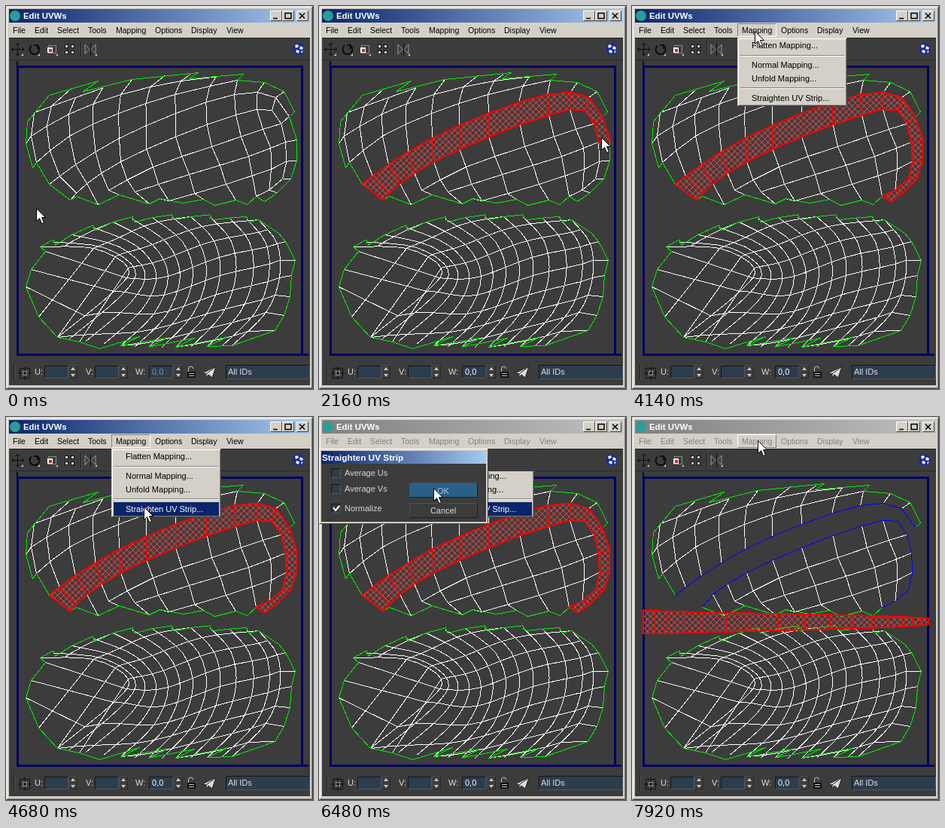
An HTML page for the animation above (8 s loop, 408x508 px).

```html
<!DOCTYPE html>
<html lang="en">
<head>
<meta charset="utf-8">
<title>Edit UVWs</title>
<style>
html, body { margin: 0; width: 100%; height: 100%; overflow: hidden; background: #d4d0c8; }
svg { display: block; width: 408px; height: 508px; font: 11px "Liberation Sans", Arial, sans-serif; cursor: default; }
text { white-space: pre; }
.mesh path { fill: none; stroke-width: 1; }
.white { stroke: #fff; }
.green { stroke: #0e0; }
.blue { stroke: #00f; }
.b { font-weight: bold; }
</style>
</head>
<body>
<svg id="stage" viewBox="0 0 408 508" xmlns="http://www.w3.org/2000/svg"></svg>
<script>
const pts = s => s.split(' ').map(p => p.split(',').map(Number));
const range = (n, f) => Array.from({ length: n }, (_, i) => f(i));
const line = p => 'M' + p.join('L');
const lerp = (a, b, f) => a.map((v, i) => v + (b[i] - v) * f);
const rect = (x, y, w, h, fill, extra = '') =>
  `<rect x="${x}" y="${y}" width="${w}" height="${h}" fill="${fill}" ${extra}/>`;
const text = (x, y, s, fill = '', extra = '') =>
  `<text x="${x}" y="${y}" ${fill && `fill="${fill}"`} ${extra}>${s}</text>`;
const path = (d, stroke, extra = 'fill="none"') => `<path d="${d}" stroke="${stroke}" ${extra}/>`;
// Box edges: light on the top left, dark on the bottom right
const bevel = (x, y, w, h, hi, lo) =>
  path(`M${x + .5} ${y + h - .5}v${1 - h}h${w - 1}`, hi) +
  path(`M${x + .5} ${y + h - .5}h${w - 1}v${1 - h}`, lo);

// Catmull-Rom point at u, with key points at whole numbers
function spline(list, u) {
  const n = list.length - 1, i = Math.min(n - 1, Math.floor(u)), f = u - i;
  const [a, b, c, d] = [i - 1, i, i + 1, i + 2].map(k => list[Math.max(0, Math.min(n, k))]);
  return [0, 1].map(k => +(b[k] + f / 2 * (c[k] - a[k] +
    f * (2 * a[k] - 5 * b[k] + 4 * c[k] - d[k] + f * (3 * (b[k] - c[k]) + d[k] - a[k])))).toFixed(1));
}
// Key points sit on every second grid line
const sample = (keys, n) => range(n, k => spline(pts(keys), k / 2));

// Upper shell: both edges of the strip, then the rows above and below it
const T = sample('57,236 92,210 150,175 225,142 303,117 358,121 386,177 378,229 343,259', 17);
const B = sample('85,257 107,235 152,206 225,173 305,144 353,138 371,180 367,229 332,252', 17);
const up = [
  '40,207 84,172 149,142 224,117 307,98',
  '33,172 83,143 152,117 232,99 316,90',
  '37,141 92,121 167,97 245,90'
].map((keys, i) => sample(keys, 9 - i));
const low = [
  '136,244 195,213 273,186 341,163',
  '171,246 243,223 322,199 371,180',
  '216,258 292,236 352,216'
].map((keys, i) => sample(keys, 7 - i));
const top1 = pts('57,236 40,207 35,214 26,182 28,153 57,118 122,99 102,113 167,97 255,88 243,96 315,90 307,98 343,101 369,113 383,140 377,146');
const hem = pts('93,252 122,263 150,250 190,262 204,255 235,261 262,256 277,264 305,257 320,263 332,252');

function upperMesh() {
  const ends = [hem[2], hem[3], hem[4], hem[6], hem[8], B[16], B[15]];
  const lines = [
    [top1[2], ...up[0]], [top1[3], ...up[1]], up[2].slice(0, 4), [up[2][1], [84, 111]],
    [T[9], top1[13]], [T[10], top1[14]], [B[2], hem[1]],
    ...low.map((r, i) => [...r, B[11 + i]]),
    ...range(9, k => [T[k], ...up.map(r => r[k]).filter(Boolean)]),
    ...range(7, k => [B[k + 3], ...low.map((r, i) => r[k - i]).filter(Boolean), ends[k]])
  ];
  return lines.map(line).join('');
}

// Lower shell: columns j = 0..12 blend four key columns, t = 0..8 runs down each
const keyCols = [
  '45,319 116,321 162,347 143,378 68,439',
  '142,286 194,316 215,358 196,408 152,450',
  '245,279 276,311 284,357 266,408 225,452',
  '335,283 360,315 363,360 345,406 300,450'
].map(pts);
const at = (j, t) => spline(keyCols.map(k => spline(k, t / 2)), j / 4);
const right = pts('371,312 384,337 379,357 377,385 369,410 357,430');
const left = pts('97,445 68,439 43,412 26,372 33,349 52,325');

function lowerMesh() {
  const lines = [
    ...right.map((p, i) => [at(12, i + 2), p]),
    ...range(13, j => range(17, i => at(j, i / 2))),
    // Rows climb a quarter step per column
    ...range(10, i => range(13, j => [j, i + 1 - j / 4])
      .filter(([, t]) => t >= 0 && t <= 8).map(([j, t]) => at(j, t))),
    ...range(3, k => [at(0, 4 - k), left[k]]),
    ...range(3, k => [at(0, 7 - k), left[k + 3]])
  ];
  return lines.map(line).join('');
}

function lowerEdge() {
  const rim = range(13, j => at(j, 0)).flatMap(([x, y], j) => j % 2 ? [[x, y - 3], [x + 3, y + 4]] : [[x, y]]);
  const teeth = [10, 8, 6, 4].flatMap(j => { const [x, y] = at(j, 8); return [[x, y], [x + 25, y - 12]]; });
  return line([...rim, [362, 301], ...right, at(12, 8), ...teeth, [124, 454], ...left]) + 'Z';
}

const strip = (a, b) => ({
  edge: line([...a, ...b.slice().reverse()]) + 'Z',
  bars: a.map((p, i) => line([p, b[i]])).join('')
});
// Straightened strip: wide quads in the middle, narrow ones at the ends
const flatX = i => {
  const u = (i / 16) ** .88;
  return 14 + 379 * (u - .55 * Math.sin(2 * Math.PI * u) / (2 * Math.PI));
};
const flatStrip = strip(
  range(17, i => [flatX(i), 256 + i * .66]),
  range(17, i => [flatX(i), 286 - Math.max(0, i - 3) * .85])
);

const menus = [[9, 'File'], [38, 'Edit'], [68, 'Select'], [109, 'Tools'], [146, 'Mapping'], [198, 'Options'], [246, 'Display'], [293, 'View']];
const grad = (id, a, b) => `<linearGradient id="${id}"><stop stop-color="${a}"/><stop offset="1" stop-color="${b}"/></linearGradient>`;
const button = (x, glyph) => rect(x, 6, 16, 14, '#d4d0c8') + bevel(x, 6, 16, 14, '#fff', '#404040') + path(glyph, '#000', 'fill="none" stroke-width="1.5"');
const field = (x, y, w, h) => rect(x, y, w, h, '#2c3d4e') + bevel(x, y, w, h, '#161616', '#555');
const spinner = x => path(`M${x - 3} 483l3 -4l3 4zM${x - 3} 488l3 4l3 -4z`, 'none', 'fill="#ccc"') + bevel(x - 6, 476, 12, 18, '#484848', '#2a2a2a');
const check = (y, s) => field(16, y - 6, 13, 13) + text(34, y + 4, s, '#d6d6d6');
const push = y => rect(120, y, 91, 20, '#3c3c3c') + bevel(120, y, 91, 20, '#505050', '#1c1c1c');
const groove = (x, y) => rect(x, y, 1, 21, '#1c1c1c') + rect(x + 1, y, 1, 21, '#555');

const frame =
  rect(0, 0, 408, 508, '#d4d0c8') + bevel(1, 1, 406, 506, '#fff', '#808080') + bevel(0, 0, 408, 508, '#d4d0c8', '#404040') +
  rect(4, 4, 400, 18, 'url(#on)', 'id="title"') +
  '<circle cx="12" cy="13" r="7" fill="#2a9d98"/>' + text(23, 17, 'Edit UVWs', '#fff', 'class="b" font-size="11.4"') +
  button(351, 'M355 16.5h6') + button(367, 'M371 9.5h8v7h-8z') + button(386, 'M390 9.5l7 7m0 -7l-7 7') +
  `<g id="menus" font-size="10.5">${menus.map(([x, s]) => text(x, 36, s)).join('')}</g>` +
  `<g id="hover">${bevel(140, 23, 52, 18, '#fff', '#808080')}</g><g id="sunk">${bevel(140, 23, 52, 18, '#808080', '#fff')}</g>` +
  rect(4, 42, 400, 461, '#3c3c3c') + rect(4, 42, 400, 1, '#222') + rect(4, 71, 400, 1, '#2a2a2a');

const tools =
  path('M15.5 50v15M8 57.5h15M13 52l2.5 -3l2.5 3M13 63l2.5 3l2.5 -3M10 55l-3 2.5l3 2.5M21 55l3 2.5l-3 2.5', '#0c0c0c') +
  path('M34 52.5a6.5 6.5 0 1 0 8 0M42 57v-5h-5', '#0c0c0c', 'fill="none" stroke-width="2"') +
  rect(56.5, 52.5, 10, 10, 'none', 'stroke="#ddd" stroke-dasharray="1 1"') + rect(55, 55, 7, 7, '#fff') + rect(57, 57, 4, 4, '#e02020') +
  range(4, i => {
    const x = 78 + i % 2 * 8, y = 51 + (i >> 1) * 8;
    return rect(x, y, 5, 5, '#111') + rect(x + 1, y + 1, 3, 3, '#ddd');
  }).join('') +
  path('M105 51l6 6.5l-6 6zM119 51l-6 6.5l6 6z', '#999') + path('M112.5 49v17', '#111') +
  [23, 45, 69, 121].map(x => path(`M${x} 66h-3l3 -3z`, 'none', 'fill="#ccc"')).join('') +
  groove(99, 47) +
  '<circle cx="389" cy="57" r="7.5" fill="#142a9a"/>' +
  path('M384 52l4 -1l1 3l-4 2zM391 53l4 2l-1 3l-4 -1zM386 58l4 1l-1 4l-4 -2zM392 60l3 -1l-2 4z', 'none', 'fill="#eef"');

const view =
  rect(15.5, 80.5, 378, 382, 'none', 'stroke="#000064" stroke-width="3"') +
  rect(14, 73, 2, 8, '#000064') + rect(394, 461, 8, 3, '#000064');

const bottom =
  rect(4, 465, 400, 38, '#3c3c3c') + groove(10, 475) +
  path('M18.5 480.5h13v13h-13zM25 478v18M16 487h18', '#111') + path('M22.5 484.5h5v5h-5z', '#999') +
  [[38, 51, 89, 'U:'], [106, 118, 156, 'V:'], [172, 190, 229, 'W:']].map(([x, f, sp, s]) =>
    text(x, 489, s, '#ddd') + field(f, 477, 32, 17) + spinner(sp)).join('') +
  text(194, 489, '0,0', '#fff', 'id="w"') +
  path('M242.5 485v-4a3 3 0 0 1 6 0', '#ccc') + rect(241, 485, 11, 8, '#111') + path('M243 487.5h7M243 490.5h7', '#ccc') +
  path('M261 487l18 -9l-5 15l-5 -4l-3 4v-5z', '#222', 'fill="#ddd"') + path('M266 488l12 -9', '#222') +
  field(292, 476, 112, 19) + text(295, 489, 'All IDs', '#ddd');

const items = [[56, 'Flatten Mapping...'], [82, 'Normal Mapping...'], [100, 'Unfold Mapping...'], [126, 'Straighten UV Strip...']];
const sep = y => rect(144, y, 138, 1, '#808080') + rect(144, y + 1, 138, 1, '#fff');
const popup =
  rect(140, 42, 146, 91, '#d4d0c8') + bevel(141, 43, 144, 89, '#fff', '#808080') + bevel(140, 42, 146, 91, '#d4d0c8', '#404040') +
  sep(65) + sep(108) +
  items.map(([y, s]) => `<g class="item">${rect(143, y - 13, 140, 18, 'none')}${text(159, y, s)}</g>`).join('');

const dialog =
  rect(224, 42, 64, 30, '#3c3c3c') +
  rect(0, 42, 225, 100, '#d4d0c8') + bevel(0, 42, 225, 100, '#fff', '#404040') +
  rect(3, 45, 219, 17, 'url(#on)') + text(4, 58, 'Straighten UV Strip', '#fff', 'class="b" font-size="11.8"') +
  rect(3, 62, 219, 77, '#3c3c3c') +
  check(74, 'Average Us') + check(95, 'Average Vs') + check(121, 'Normalize') +
  path('M19 120l3 4l5 -6', '#fff', 'id="tick" fill="none" stroke-width="2"') +
  push(87) + push(114) + rect(121, 88, 89, 18, '#2a6088', 'id="hot"') +
  text(165, 102, 'OK', '#ddd', 'id="ok" text-anchor="middle"') + text(165, 128, 'Cancel', '#ddd', 'text-anchor="middle"');

const mesh = (d, cls) => `<path class="${cls}" d="${d}"/>`;
const stage = document.getElementById('stage');
stage.innerHTML =
  `<defs>${grad('on', '#0a246a', '#a6caf0')}${grad('off', '#808080', '#c0c0c0')}
  <pattern id="hatch" width="8" height="8" patternUnits="userSpaceOnUse"><path d="M-1 -1L9 9M9 -1L-1 9" stroke="#ff4848"/></pattern></defs>` +
  frame + tools + view +
  '<g class="mesh" transform="translate(.5 .5)" shape-rendering="crispEdges">' +
  mesh(upperMesh() + lowerMesh(), 'white') +
  mesh(line(top1) + line(hem) + lowerEdge(), 'green') +
  '<g id="whole">' + mesh(line(T.slice(0, 12)) + line(B) + strip(T, B).bars, 'white') +
  mesh(line([...T.slice(11), B[16]]) + line([T[0], B[0], hem[0]]), 'green') + '</g>' +
  '<g id="cut">' + mesh(line(T.slice(0, 12)) + line([hem[0], ...B.slice(2)]), 'blue') + '</g>' +
  '<path id="fill" style="fill:url(#hatch)"/><path id="bars" stroke="#f00" style="stroke-width:1.5"/><path id="edge" stroke="#f00" style="stroke-width:2"/></g>' +
  bottom + `<g id="popup">${popup}</g><g id="dialog">${dialog}</g>` +
  '<path id="mouse" d="M.5 .5v17l4 -4l3 7l3 -1l-3 -7h5z" fill="#fff" stroke="#000"/>';

// Pointer path after the selection: step, x, y
const STEP = 180;
const way = pts('17,341,261 18,341,261 23,163,33 25,183,118 27,183,120 28,173,125 30,79,121 32,55,121 33,55,121 36,152,94 40,152,94 44,167,31');

function pointer(s) {
  if (!s) return [40, 268];
  if (s < 17) return lerp(T[s], B[s], .45).map(v => v - 4);
  const i = Math.max(1, way.findIndex(p => p[0] >= s));
  const [a, b] = [way[i - 1], way[i]];
  return lerp(a, b, (s - a[0]) / (b[0] - a[0])).slice(1);
}

const $ = id => document.getElementById(id);
const show = (id, on) => $(id).setAttribute('visibility', on ? 'inherit' : 'hidden');
const itemEls = [...document.querySelectorAll('.item')];

function draw(s) {
  const cut = s >= 39, modal = s >= 27;
  $('mouse').setAttribute('transform', `translate(${pointer(s).map(Math.round)})`);
  $('title').setAttribute('fill', modal ? 'url(#off)' : 'url(#on)');
  $('menus').setAttribute('fill', modal ? '#808080' : '#000');
  $('w').setAttribute('fill', s ? '#fff' : '#7f92a6');
  show('hover', s === 22 || s === 44);
  show('sunk', s >= 23 && !modal);
  show('popup', s >= 23 && !cut);
  show('dialog', modal && !cut);
  show('tick', s >= 32 && !cut);
  show('hot', s >= 35 && !cut);
  $('ok').setAttribute('fill', s >= 35 ? '#a9c4d6' : '#ddd');
  show('whole', !cut);
  show('cut', cut);
  const lit = s >= 25 ? 3 : s === 24 ? 1 : -1;
  itemEls.forEach((el, i) => {
    el.children[0].setAttribute('fill', i === lit ? '#0a246a' : 'none');
    el.children[1].setAttribute('fill', i === lit ? '#fff' : '#000');
  });
  // One more quad per step
  const n = Math.min(16, s) + 1;
  const sel = cut ? flatStrip : s ? strip(T.slice(0, n), B.slice(0, n)) : { edge: '', bars: '' };
  $('fill').setAttribute('d', sel.edge);
  $('edge').setAttribute('d', sel.edge);
  $('bars').setAttribute('d', sel.bars);
}

const start = performance.now();
let last = -1;
function tick() {
  const s = Math.floor((performance.now() - start) % 8000 / STEP);
  if (s !== last) draw(last = s);
  requestAnimationFrame(tick);
}
tick();
</script>
</body>
</html>
```
